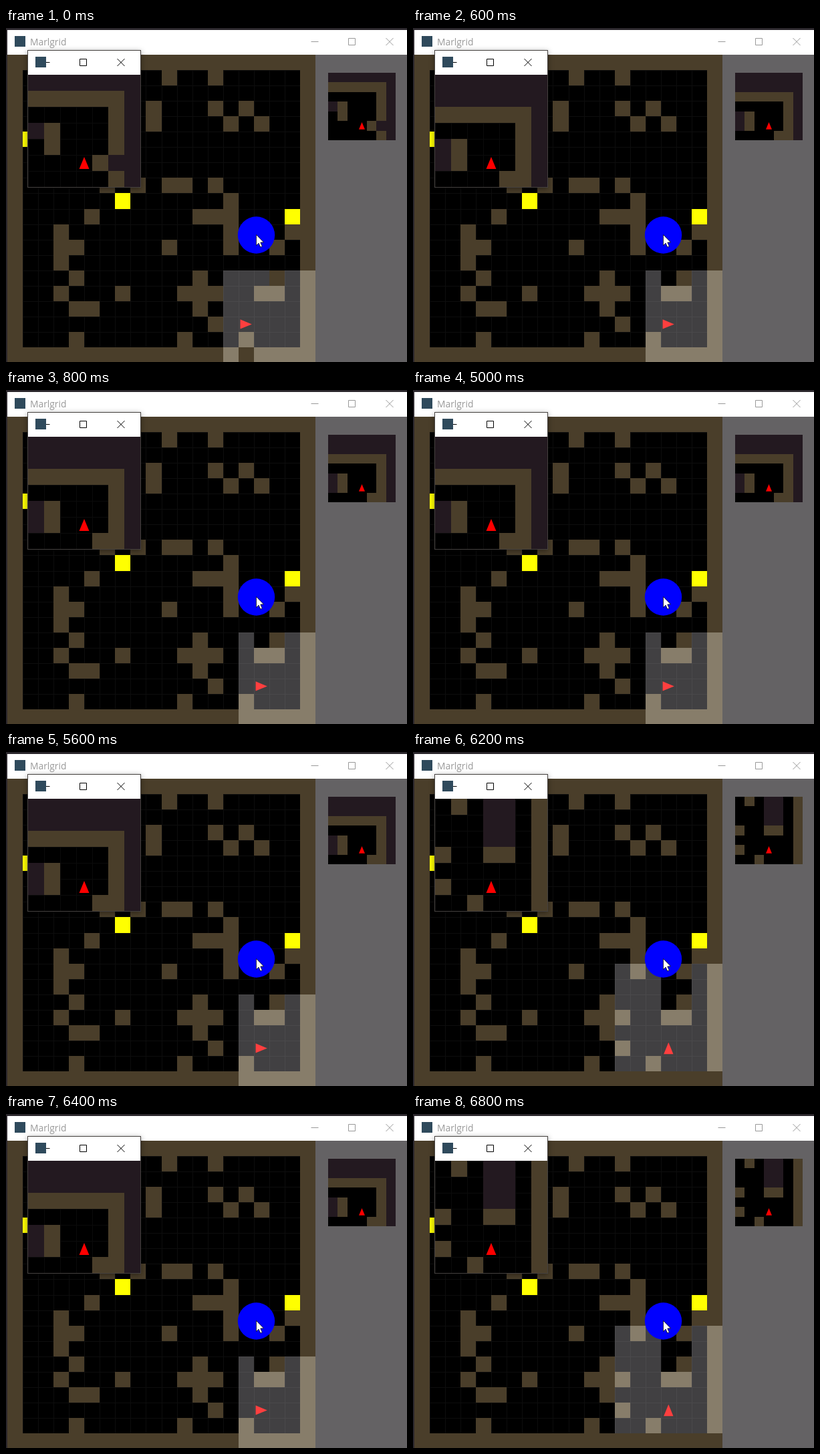
Write an HTML page with a canvas that moves like this. It is 600 by 500 pixels and loops after 8 s.

```html
<!DOCTYPE html>
<html>
<head>
<meta charset="utf-8">
<title>Marlgrid</title>
<style>
html, body { margin: 0; width: 100%; height: 100%; overflow: hidden; background: #000; }
canvas { display: block; }
</style>
</head>
<body>
<canvas id="stage" width="600" height="500"></canvas>
<script>
const ctx = document.getElementById('stage').getContext('2d');
const LOOP = 8000, N = 20, VIEW = 7;

// # wall, Y goal tile
const MAP = [
  '####################',
  '#.........#..#.....#',
  '#..................#',
  '#........#...#.#...#',
  '#........#....#.#..#',
  '#Y.................#',
  '#..................#',
  '#..................#',
  '#.....#.#.##.#.....#',
  '#......Y......#....#',
  '#....#......###...Y#',
  '#..#..........#...##',
  '#..##.....#...#..#.#',
  '#..#...............#',
  '#...#.......#....#.#',
  '#..#...#...###..##.#',
  '#...##......#......#',
  '#............#.....#',
  '#...#......#...#...#',
  '####################'
];
const COLOR = { '#': '#4a3e2a', Y: '#ffff00', '.': '#000' };
const LIT = { '#': '#877d6a', Y: '#ffff4c', '.': '#414042' };
const SHADOW = '#231920';

// hidden: occluded cells as "column,row"
const START = { x: 15, y: 17, up: false, hidden: ['17,14', '15,19'] };
const EAST = { x: 16, y: 17, up: false, hidden: ['16,14', '17,14'] };
const NORTH = { x: 16, y: 17, up: true,
  hidden: ['16,12', '17,12', '16,13', '17,13', '16,14', '17,14'] };
const STEPS = [[0, START], [600, EAST], [6200, NORTH], [6400, EAST], [6800, NORTH]];

function rect(x, y, w, h, color) {
  ctx.fillStyle = color;
  ctx.fillRect(x, y, w, h);
}

function cell(x0, y0, size, col, row, type, colors, line) {
  const x = Math.round(x0 + col * size), y = Math.round(y0 + row * size);
  const w = Math.round(x0 + (col + 1) * size) - x;
  const h = Math.round(y0 + (row + 1) * size) - y;
  rect(x, y, w, h, colors[type]);
  if (type === '.' && line) {
    rect(x, y, w, 1, line);
    rect(x, y, 1, h, line);
  }
}

function agent(x, y, size, up, color) {
  ctx.save();
  ctx.translate(x + size / 2, y + size / 2);
  if (up) ctx.rotate(-Math.PI / 2);
  ctx.scale(size, size);
  ctx.beginPath();
  ctx.moveTo(-0.38, -0.31);
  ctx.lineTo(0.37, 0);
  ctx.lineTo(-0.38, 0.31);
  ctx.fillStyle = color;
  ctx.fill();
  ctx.restore();
}

// World cell seen at column u, row v of the agent's own view
function look(s, u, v) {
  const x = s.up ? s.x + u - 3 : s.x + 5 - v;
  const y = s.up ? s.y + v - 5 : s.y + u - 3;
  const seen = x < N && y < N && !s.hidden.includes(x + ',' + y);
  return { x, y, seen };
}

function eachView(s, draw) {
  for (let v = 0; v < VIEW; v++)
    for (let u = 0; u < VIEW; u++) draw(look(s, u, v), u, v);
}

function world(s) {
  const x0 = 2, y0 = 40, size = 23.05;
  for (let r = 0; r < N; r++)
    for (let c = 0; c < N; c++) cell(x0, y0, size, c, r, MAP[r][c], COLOR, '#0d0d0d');
  eachView(s, p => {
    if (p.seen) cell(x0, y0, size, p.x, p.y, MAP[p.y][p.x], LIT, '#4a494b');
  });
  agent(x0 + s.x * size, y0 + s.y * size, size, s.up, '#fe3f3f');
}

function agentView(s, x, y, size, line) {
  rect(x, y, Math.round(size * VIEW), Math.round(size * VIEW), SHADOW);
  eachView(s, (p, u, v) => {
    if (p.seen) cell(x, y, size, u, v, MAP[p.y][p.x], COLOR, line);
  });
  agent(x + 3 * size, y + 5 * size, size, true, '#fe0000');
}

// Minimise, maximise and close, centred at x on the line y
function buttons(xs, y, color) {
  const [a, b, c] = xs;
  ctx.strokeStyle = color;
  ctx.lineWidth = 1;
  ctx.beginPath();
  ctx.moveTo(a - 5, y);
  ctx.lineTo(a + 6, y);
  ctx.rect(b - 5, y - 5, 10, 10);
  ctx.moveTo(c - 5.5, y - 5.5);
  ctx.lineTo(c + 5.5, y + 5.5);
  ctx.moveTo(c + 5.5, y - 5.5);
  ctx.lineTo(c - 5.5, y + 5.5);
  ctx.stroke();
}

function pointer() {
  ctx.beginPath();
  ctx.arc(374.5, 310, 27.7, 0, 2 * Math.PI);
  ctx.fillStyle = '#0000fe';
  ctx.fill();
  const pts = [[0, 0], [0, 16], [3.6, 12.6], [6.2, 18.5], [8.8, 17.3], [6.3, 11.6], [11, 11.3]];
  ctx.beginPath();
  for (const [x, y] of pts) ctx.lineTo(374.5 + x, 309.5 + y);
  ctx.closePath();
  ctx.fillStyle = '#fff';
  ctx.fill();
  ctx.strokeStyle = '#111';
  ctx.lineWidth = 0.8;
  ctx.stroke();
}

function mainWindow(s) {
  rect(0, 0, 600, 500, '#2b272c');
  rect(2, 3, 598, 37, '#fff');
  rect(13, 12, 16, 16, '#2f4a5c');
  ctx.font = '13.8px "Open Sans", "Noto Sans", sans-serif';
  ctx.fillStyle = '#999';
  ctx.fillText('Marlgrid', 36, 26);
  buttons([461.5, 517.5, 574], 20.5, '#999');
  rect(463, 40, 137, 460, '#646264');
  world(s);
  agentView(s, 482, 67, 101 / VIEW);
}

function smallWindow(s) {
  ctx.save();
  ctx.shadowColor = 'rgba(0,0,0,.4)';
  ctx.shadowBlur = 8;
  ctx.shadowOffsetY = 2;
  rect(32, 33, 170, 206, '#45413f');
  ctx.restore();
  rect(33, 34, 168, 36, '#fff');
  buttons([59.5, 115.5, 172], 51.5, '#000');
  rect(44, 43, 16, 16, '#2f4a5c');
  agentView(s, 33, 70, 24, '#0b0b0b');
}

function frame(now) {
  const t = now % LOOP;
  const s = STEPS.filter(step => step[0] <= t).pop()[1];
  mainWindow(s);
  pointer();
  smallWindow(s);
}

const begin = performance.now();
function tick() {
  frame(performance.now() - begin);
  requestAnimationFrame(tick);
}
tick();
</script>
</body>
</html>
```
